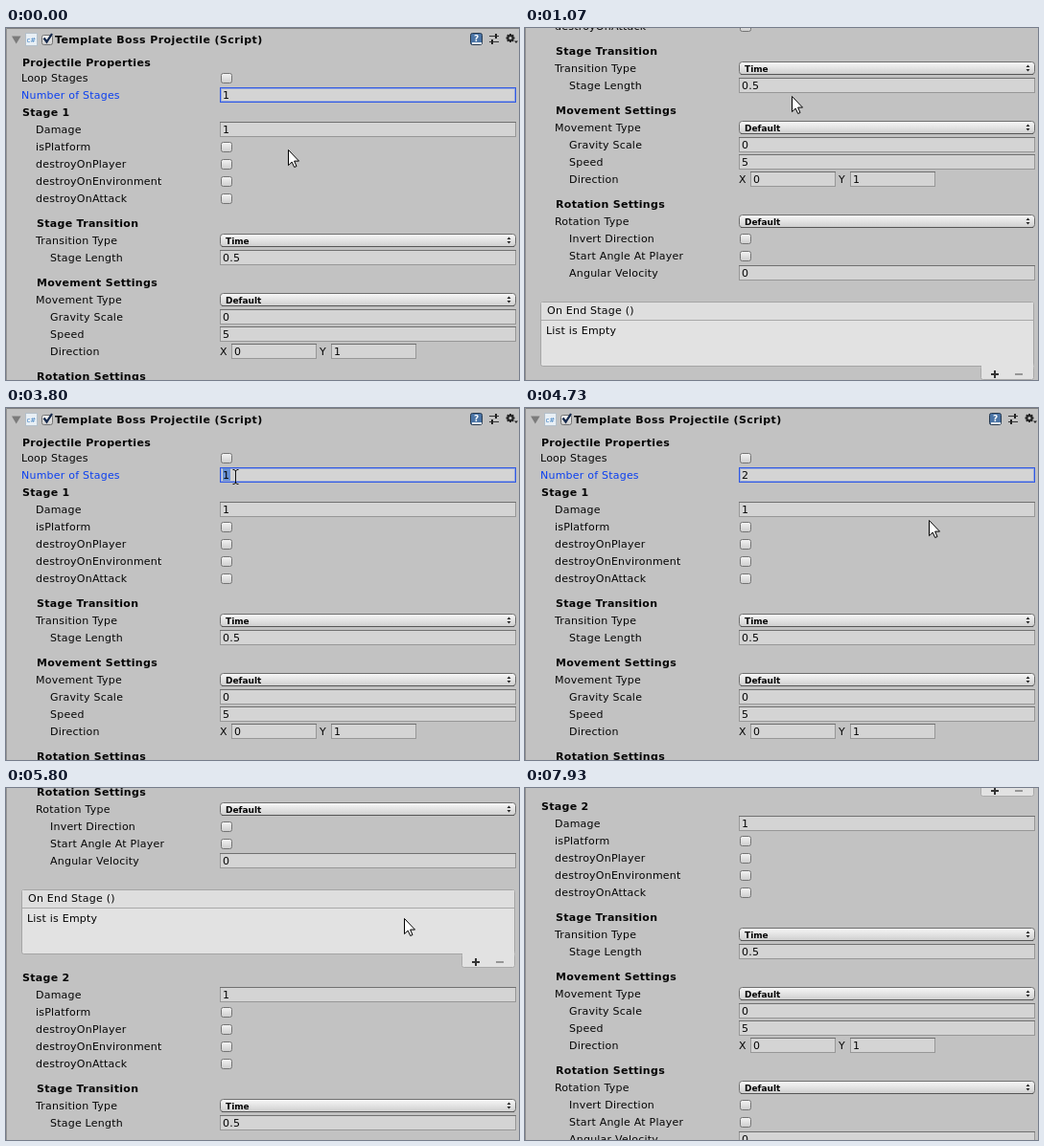
An HTML page that plays this animation: 535x368 px, repeating every 8.67 s.

```html
<!DOCTYPE html>
<html lang="en">
<head>
<meta charset="utf-8">
<title>Inspector panel</title>
<style>
  html, body { margin: 0; width: 100%; height: 100%; overflow: hidden; background: #c2c2c2; }
  svg { display: block; position: absolute; left: 0; top: 0; }
  text { font: 11px "DejaVu Sans", sans-serif; letter-spacing: .22px; fill: #050505; white-space: pre; }
  text.bold { font-weight: bold; letter-spacing: .3px; }
  text.title { font-weight: bold; letter-spacing: .41px; }
  text.mini { font-size: 9px; font-weight: bold; letter-spacing: 0; }
  text.focus { fill: #0a3ff0; }
  rect { shape-rendering: crispEdges; }
  rect.round { shape-rendering: auto; }
</style>
</head>
<body>
<svg id="stage" width="535" height="368" viewBox="0 0 535 368">
  <defs>
    <linearGradient id="button" x2="0" y2="1">
      <stop offset="0" stop-color="#f8f8f8"/><stop offset="1" stop-color="#cecece"/>
    </linearGradient>
    <linearGradient id="box" x2="0" y2="1">
      <stop offset="0" stop-color="#f4f4f4"/><stop offset="1" stop-color="#cdcdcd"/>
    </linearGradient>
  </defs>
  <rect width="535" height="368" fill="#c2c2c2"/>
  <g id="panel"></g>
  <rect width="1" height="368" fill="#949494"/>
  <path id="arrow" d="M.5 .5V16.6L4.2 13.1L6.7 18.5L9 17.5L6.6 12.1H11.5Z" fill="#fff" stroke="#000"/>
  <path id="beam" d="M-3 -7.5H-1M1 -7.5H3M-1 -6.5H1M0 -6V6M-1 6.5H1M-3 7.5H-1M1 7.5H3" fill="none" stroke="#111"/>
</svg>
<script>
const DURATION = 8670;
const STAGE_PITCH = 470;
const textFields = [];

// Every row helper takes the vertical centre of its row.
const label = (x, y, text, kind = "") =>
  `<text x="${x}" y="${y + 4}" class="${kind}">${text}</text>`;

const rect = (x, y, w, h, fill, more = "") =>
  `<rect x="${x}" y="${y}" width="${w}" height="${h}" fill="${fill}" ${more}/>`;

const frame = (x, y, w, h, fill, stroke, radius = 0) =>
  `<rect x="${x + .5}" y="${y + .5}" width="${w - 1}" height="${h - 1}" rx="${radius}"
    fill="${fill}" stroke="${stroke}" ${radius ? 'class="round"' : ""}/>`;

function field(y, value, x = 223, w = 309) {
  textFields.push({ x, y: y - 8, w, h: 16 });
  return frame(x, y - 8, w, 16, "#d4d4d4", "#979797")
    + rect(x, y - 8, w, 1, "#707070") + label(x + 3, y, value);
}

const checkbox = (y, x = 224) => frame(x, y - 5, 12, 11, "url(#box)", "#747474", 2);

const popup = (y, value) =>
  frame(223, y - 7, 309, 14, "url(#button)", "#6e6e6e", 3)
  + rect(225, y + 6, 305, 1, "#555")
  + label(229, y - .5, value, "mini")
  + `<path d="M522.5 ${y - 1}h4l-2 -2.5zM522.5 ${y + 1}h4l-2 2.5z" fill="#222"/>`;

function header() {
  const gearTeeth = Array.from({ length: 8 }, (_, i) =>
    `<path d="M526 6V8" stroke="#222" stroke-width="2" transform="rotate(${i * 45} 526 10.5)"/>`).join("");
  return rect(0, 0, 535, 1, "#828282")
    + `<path d="M6 8.5H15.5L10.7 16.5Z" fill="#7b7b7b"/>`
    + frame(20, 5, 13, 14, "#e8eff5", "#b4c0ca")
    + `<text x="21.5" y="15" style="font-size:7px;letter-spacing:0;fill:#3c7fc0">c#</text>`
    + checkbox(12, 37)
    + `<path d="M39.5 10.5L42.5 14.5L48 6" fill="none" stroke="#14284c" stroke-width="2.3"/>`
    + frame(484, 5, 13, 13, "#4a74a6", "#26394f", 2)
    + rect(486, 15, 10, 2, "#e8edf2")
    + `<text x="488" y="14" class="bold" style="font-size:9px;letter-spacing:0;fill:#fff">?</text>`
    + label(51, 12, "Template Boss Projectile (Script)", "title")
    + `<path d="M504 8.5H514M504 14.5H514" stroke="#333"/>`
    + rect(510, 6, 2, 5, "#222") + rect(506, 12, 2, 5, "#222")
    + gearTeeth
    + `<circle cx="526" cy="10.5" r="2.6" fill="none" stroke="#222" stroke-width="2"/>`
    + `<path d="M530 13.5h4l-2 2.5z" fill="#222"/>`;
}

function properties() {
  return label(17, 36, "Projectile Properties", "bold")
    + label(16, 52, "Loop Stages") + checkbox(52)
    + label(16, 70, "Number of Stages", "focus")
    + field(70, "")
    + frame(224, 63, 307, 14, "none", "#98a9dc")
    + frame(223, 62, 309, 16, "none", "#3059e4")
    + rect(226, 63, 8, 13, "#6790d4", 'id="selection"')
    + `<text id="count" x="226" y="74">1</text>`;
}

function endList(top) {
  return frame(16, top, 515, 68, "#e2e2e2", "#a5a5a5", 2)
    + rect(17, top + 1, 513, 18, "#dedede")
    + rect(17, top + 19, 513, 1, "#a9a9a9")
    + label(23, top + 9, "On End Stage ()")
    + label(22, top + 30, "List is Empty")
    + frame(475, top + 67, 56, 15, "#e2e2e2", "#aaa", 2)
    + rect(476, top + 66, 54, 3, "#e2e2e2")
    + rect(486, top + 75, 8, 2, "#333") + rect(489, top + 72, 2, 8, "#333")
    + rect(511, top + 75, 8, 2, "#969696");
}

function stageBlock(number) {
  const top = 88 + (number - 1) * STAGE_PITCH;
  const at = offset => top + offset;
  const toggles = ["isPlatform", "destroyOnPlayer", "destroyOnEnvironment", "destroyOnAttack"]
    .map((name, i) => label(31, at(36 + 18 * i), name) + checkbox(at(36 + 18 * i))).join("");
  return label(17, top, `Stage ${number}`, "bold")
    + label(31, at(18), "Damage") + field(at(18), "1")
    + toggles
    + label(32, at(116), "Stage Transition", "bold")
    + label(31, at(134), "Transition Type") + popup(at(134), "Time")
    + label(46, at(152), "Stage Length") + field(at(152), "0.5")
    + label(32, at(178), "Movement Settings", "bold")
    + label(31, at(196), "Movement Type") + popup(at(196), "Default")
    + label(46, at(214), "Gravity Scale") + field(at(214), "0")
    + label(46, at(232), "Speed") + field(at(232), "5")
    + label(46, at(250), "Direction")
    + label(223, at(250), "X") + field(at(250), "0", 235, 89)
    + label(327, at(250), "Y") + field(at(250), "1", 339, 89)
    + label(32, at(276), "Rotation Settings", "bold")
    + label(31, at(294), "Rotation Type") + popup(at(294), "Default")
    + label(46, at(312), "Invert Direction") + checkbox(at(312))
    + label(46, at(330), "Start Angle At Player") + checkbox(at(330))
    + label(46, at(348), "Angular Velocity") + field(at(348), "0")
    + endList(at(378));
}

const byId = id => document.getElementById(id);
const panel = byId("panel"), arrow = byId("arrow"), beam = byId("beam");
panel.innerHTML = header() + properties() + stageBlock(1) + stageBlock(2);
const selection = byId("selection"), count = byId("count");

// Pointer moves: first step, last step, number of steps, x, y.
const START = { x: 294, y: 127 };
const MOVES = [
  [70, 130, 2, 257, 80],
  [270, 400, 3, 276, 67],
  [530, 530, 1, 279, 71],
  [1070, 1070, 1, 278, 71],
  [2130, 2130, 1, 280, 72],
  [2330, 2530, 4, 290, 72],
  [2870, 3200, 6, 215, 71],
  [3800, 3800, 1, 239, 72],
  [3870, 4130, 5, 510, 117],
  [4470, 4670, 4, 422, 109],
  [4730, 4730, 1, 421, 117],
  [5600, 5930, 6, 413, 143],
  [6530, 6530, 1, 413, 145],
  [7130, 7270, 3, 370, 206],
  [7600, 7870, 5, 99, 358],
  [7930, 7930, 1, 90, 375]
];
const SCROLLS = [
  [0, 0], [1000, 120], [1070, 180], [2130, 0], [5270, 180], [5330, 240],
  [5600, 300], [5800, 360], [6130, 420], [6200, 480], [6270, 539]
];
const SELECT_FROM = 3130, TYPED_AT = 4330;

const ease = p => p * p * (3 - 2 * p);

function pointerAt(t) {
  let { x, y } = START;
  for (const [first, last, steps, toX, toY] of MOVES) {
    if (t < first) break;
    const gap = steps > 1 ? (last - first) / (steps - 1) : 1;
    const done = Math.min(steps, 1 + Math.floor((t - first) / gap + 1e-6));
    const p = ease(done / steps);
    x += (toX - x) * p;
    y += (toY - y) * p;
    if (done < steps) break;
  }
  return { x: Math.round(x), y: Math.round(y) };
}

const scrollAt = t => SCROLLS.findLast(([time]) => time <= t)[1];

function draw(t) {
  const { x, y } = pointerAt(t);
  const scroll = scrollAt(t);
  const docY = y + scroll;
  const overText = textFields.some(f =>
    x >= f.x && x < f.x + f.w && docY >= f.y && docY < f.y + f.h);
  panel.setAttribute("transform", `translate(0 ${-scroll})`);
  arrow.setAttribute("transform", `translate(${x} ${y})`);
  beam.setAttribute("transform", `translate(${x + .5} ${y})`);
  arrow.style.display = overText ? "none" : "";
  beam.style.display = overText ? "" : "none";
  selection.style.display = t >= SELECT_FROM && t < TYPED_AT ? "" : "none";
  count.textContent = t >= TYPED_AT ? "2" : "1";
}

const began = performance.now();
function tick() {
  draw((performance.now() - began) % DURATION);
  requestAnimationFrame(tick);
}
tick();
</script>
</body>
</html>
```
